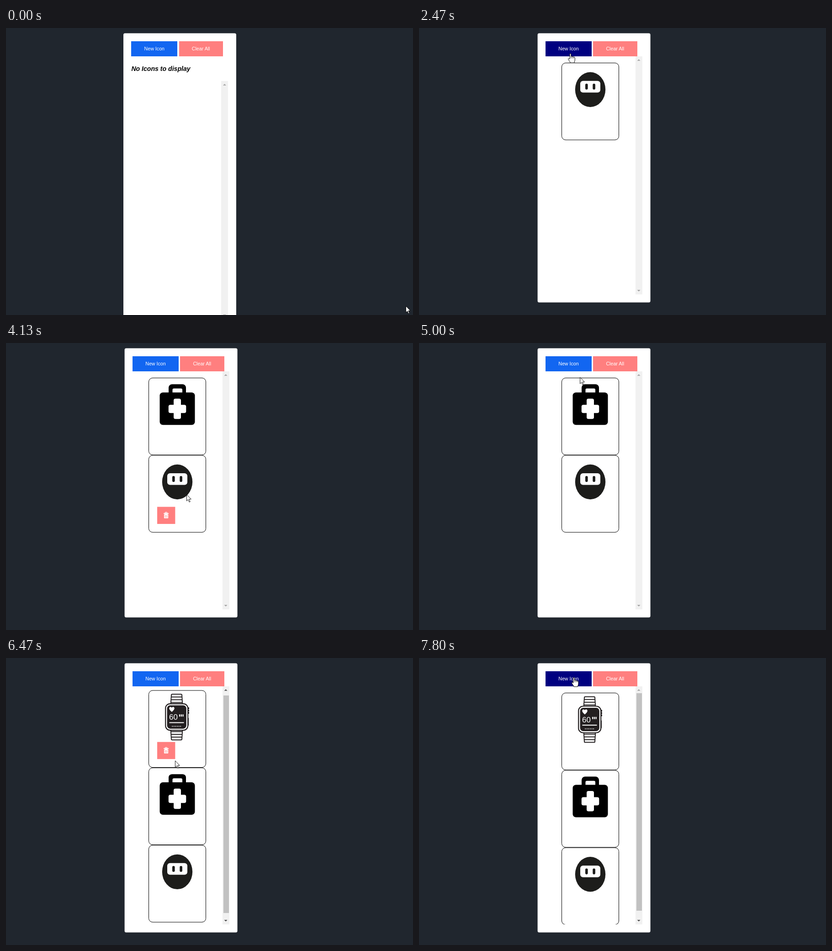
Recreate the animation shown at these times as an HTML page. Size 891 by 628 pixels, loop 8 s.

```html
<!DOCTYPE html>
<html lang="en">
<head>
<meta charset="utf-8">
<title>Icon list</title>
<style>
html, body { margin: 0; width: 100%; height: 100%; overflow: hidden; background: #20262e; }
svg { display: block; width: 891px; height: 628px; }
text { font-family: "Liberation Sans", Arial, sans-serif; }
.label { font-size: 10.67px; fill: #fff; }
.empty { font-size: 14.1px; font-weight: bold; font-style: italic; fill: #000; }
.crisp { shape-rendering: crispEdges; }
</style>
</head>
<body>
<svg viewBox="0 0 891 628">
  <defs>
    <clipPath id="view"><rect x="277" y="62" width="197" height="521"/></clipPath>
  </defs>
  <rect width="891" height="628" fill="#20262e"/>
  <g id="page">
    <rect id="panel" x="257" y="11.5" width="247" height="589" rx="3.5" fill="#fff"/>
    <rect id="add" class="crisp" x="274.4" y="29" width="100.6" height="33"/>
    <text class="label" x="302.6" y="49.4">New Icon</text>
    <rect class="crisp" x="378.7" y="29" width="96.3" height="33" fill="#ff7f7f"/>
    <text class="label" x="406.8" y="49.4">Clear All</text>
    <text id="empty" class="empty" x="274.4" y="94">No Icons to display</text>
    <g id="bar">
      <rect class="crisp" x="471" y="62" width="15" height="521" fill="#f1f1f1"/>
      <path id="up" d="M475 71.7L478.5 68.2L482 71.7Z"/>
      <path id="down" d="M475 573L478.5 576.5L482 573Z"/>
      <rect id="thumb" class="crisp" x="473" y="77" width="12" height="476" fill="#c1c1c1"/>
    </g>
  </g>
  <g clip-path="url(#view)"><g id="list"></g></g>
  <path id="arrow" d="M.5 .5V14.6L3.7 11.6L6.1 17.1L8.2 16.2L5.9 10.8H10.3Z" fill="#fff" stroke="#000" stroke-width=".9"/>
  <g id="hand" stroke="#000" stroke-linejoin="round">
    <path fill="#fff" d="M-1.3 12V1.9C-1.3 .1 1.6 .1 1.6 1.9V7.2C1.9 5.7 4.4 6 4.5 7.6C5 6.5 7.2 6.9 7.3 8.6C8 7.6 10 8.1 10 10V14.5C10 17 8.7 18 8.5 20.8H-.1C-.3 18.5-2.6 16.4-4.2 13.5C-5.5 11.3-3.3 10.2-1.3 12.6Z"/>
    <path fill="none" d="M1.6 7V11M4.5 7.6V11M7.3 8.6V11" stroke-width=".8"/>
  </g>
</svg>
<script>
const $ = id => document.getElementById(id);
const TICK = 200 / 3, LOOP = 8000;
const TOP = 76.5, PITCH = 169.3, CARD = 168.4, SCROLL = 16.4;
const INK = "#231f20", PINK = "#ff7f7f";

const box = (x, y, w, h, r, fill) =>
  `<rect x="${x}" y="${y}" width="${w}" height="${h}" rx="${r}" fill="${fill}"/>`;
const row = (n, fn) => Array.from({ length: n }, (_, i) => fn(i)).join("");

// Icons are drawn relative to the top of their card.
function ninja() {
  const dark = "#1d1d1b";
  return `<ellipse cx="375" cy="58.2" rx="33.2" ry="38.2" fill="${dark}"/>` +
    box(353, 39.2, 44, 25.5, 6, "#fff") +
    row(2, i => box(364 + i * 16.3, 45.3, 5.6, 13, 2.8, dark));
}

function kit() {
  return box(356, 13.8, 38, 30, 7.5, "#000") + box(364.5, 23, 21.5, 12, 3, "#fff") +
    box(336.5, 31.7, 77, 71, 7, "#000") +
    box(367, 45.3, 16, 44.5, 4, "#fff") + box(355.8, 58.8, 38.5, 18, 4, "#fff");
}

function watch() {
  const strap = `<g fill="none" stroke="${INK}" stroke-width="2">
    <path d="M360.7 30L362 10Q362 8.3 364 8.3H383Q385 8.3 385 10L386.3 30"/>` +
    row(3, i => `<path d="M361.5 ${14.3 + i * 6}H385.5"/>`) + "</g>";
  return strap + `<g transform="matrix(1 0 0 -1 0 116.4)">${strap}</g>` +
    row(3, i => box(397, 37 + i * 5, 4, 4, 1, INK)) + box(398, 60, 2, 17, 1, INK) +
    `<rect x="349.2" y="29" width="49" height="58" rx="10" fill="#fff" stroke="${INK}" stroke-width="2.2"/>` +
    box(352.6, 32.4, 42.2, 51.2, 7, INK) +
    `<path d="M363 47C360 44 357.3 42 357.3 39C357.3 35.4 361.8 35 363 38C364.2 35 368.7 35.4 368.7 39C368.7 42 366 44 363 47Z" fill="#fff"/>
     <text x="357" y="64.4" font-size="17" fill="#fff">60</text>` +
    row(3, i => box(379 + i * 3.7, 52.2, 2.2, 5, .5, "#fff")) +
    box(357.5, 69.4, 32, 2, 0, "#fff") +
    row(6, i => box(363.2 + i * 3.6, 77.4, 2, 2, 1, "#fff"));
}

function trash() {
  return box(331, 112.7, 39.4, 37.4, 0, PINK) +
    `<rect x="348.4" y="124.6" width="4.2" height="4" rx="1" fill="none" stroke="#fff" stroke-width="1.2"/>` +
    box(345, 126.2, 11.2, 1.8, .6, "#fff") + box(346, 128.6, 9.2, 9.2, 1.2, "#fff") +
    row(3, i => box(347.7 + i * 2.5, 130.2, .8, 6, .3, PINK));
}

function makeCard(icon, born, shown) {
  const g = document.createElementNS("http://www.w3.org/2000/svg", "g");
  g.innerHTML = `<rect x="312.5" width="125" height="${CARD}" rx="8.5" fill="#fff" stroke="#000"/>` +
    `<g>${icon()}</g><g>${trash()}</g>`;
  $("list").append(g);
  return { g, born, shown, icon: g.children[1], bin: g.children[2] };
}

// Newest first: tick when the card is added, tick when its image loads.
const cards = [makeCard(watch, 80, 81), makeCard(kit, 43, 45), makeCard(ninja, 21, 26)];

// Pointer moves: from tick, to tick, target x, y. It rests in between.
const START = [875, 608];
const moves = [
  [0, 2, 736, 472], [3, 10, 340, 8], [10, 14, 321, 38], [15, 17, 324, 45],
  [31, 35, 331, 57], [36, 40, 333, 47], [50, 62, 395, 331], [66, 77, 348, 50],
  [87, 88, 348, 60], [88, 99, 372, 240], [100, 106, 322, 22],
  [107, 113, 350, 150], [113, 117, 339, 42]
];

const ramp = (n, from, to) => Math.min(1, Math.max(0, (n - from) / (to - from)));
const smooth = p => p * p * (3 - 2 * p);

function pointer(n) {
  let [x, y] = START;
  for (const [from, to, tx, ty] of moves) {
    const p = smooth(ramp(n, from, to));
    x += (tx - x) * p;
    y += (ty - y) * p;
  }
  return [x, y];
}

const show = (el, on) => el.setAttribute("display", on ? "inline" : "none");
const place = (el, x, y) => el.setAttribute("transform", `translate(${x} ${y})`);
const fill = (el, color) => el.setAttribute("fill", color);

function draw(ms) {
  const n = Math.floor((ms + 4) / TICK);
  const [x, y] = pointer(n);
  const part = ramp(n, 95, 101) - ramp(n, 113, 116);
  const filled = n >= 21, long = n >= 80, dx = filled ? 2.6 : 0;

  place($("page"), dx, 0);
  $("panel").setAttribute("height", filled ? 589 : 643);
  show($("empty"), !filled);
  place($("bar"), 0, filled ? 0 : 54);
  show($("thumb"), long);
  $("thumb").setAttribute("y", 77 + part * 15);
  fill($("up"), long && part > 0 ? "#505050" : "#a3a3a3");
  fill($("down"), long && part < 1 ? "#505050" : "#a3a3a3");

  const hover = x >= 274 + dx && x < 375 + dx && y >= 29 && y < 62;
  fill($("add"), hover ? "#000080" : "#1266f1");
  show($("hand"), hover);
  show($("arrow"), !hover);
  place($("hand"), x, y);
  place($("arrow"), x, y);

  let top = TOP - part * SCROLL;
  for (const c of cards) {
    const on = n >= c.born;
    show(c.g, on);
    if (!on) continue;
    place(c.g, 0, top);
    show(c.icon, n >= c.shown);
    show(c.bin, x > 312 && x < 438 && y > Math.max(62, top) && y < top + CARD);
    top += PITCH;
  }
}

function frame() {
  draw(performance.now() % LOOP);
  requestAnimationFrame(frame);
}
frame();
</script>
</body>
</html>
```
